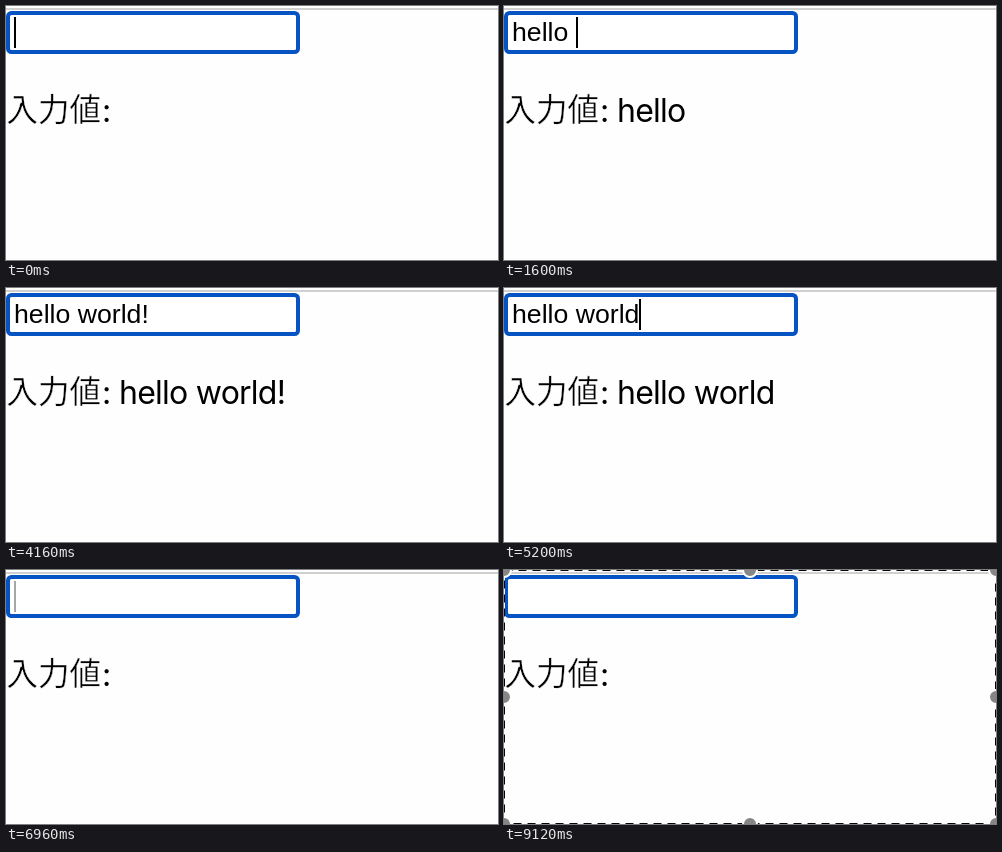
Recreate the animation shown at these times as an HTML page. Size 492x254 px, loop 9.2 s.

```html
<!DOCTYPE html>
<html lang="ja">
<head>
<meta charset="utf-8">
<title>入力値</title>
<style>
  html, body { margin: 0; width: 100%; height: 100%; overflow: hidden; background: #fefefe; }
  svg { display: block; width: 492px; height: 254px; }
  text { white-space: pre; fill: #000; }
  #field { font: 26.667px "Liberation Sans", Arial, sans-serif; }
  /* A thin background stroke lightens the regular weight */
  .label { font: 31.5px "Noto Sans CJK JP", "Noto Sans CJK", sans-serif; stroke: #fefefe; stroke-width: 0.4px; }
  .value { font: 32px Inter, sans-serif; letter-spacing: -0.75px; }
</style>
</head>
<body>
<svg viewBox="0 0 492 254">
  <rect y="2" width="492" height="2" fill="#d0d0d0"/>
  <rect x="2" y="7" width="290" height="39" rx="3.5" fill="#fff" stroke="#0653c3" stroke-width="4"/>
  <text id="field" x="8" y="35"></text>
  <rect id="caret" y="11" width="2" height="31"/>
  <text class="label" x="0.5" y="115.3">入力値</text>
  <text class="value" x="96" y="116">:</text>
  <text class="value" id="value" x="113" y="116"></text>
  <g id="selection" fill="none">
    <rect x="0.5" y="0.5" width="491" height="253" stroke="#fff"/>
    <rect x="0.5" y="0.5" width="491" height="253" stroke="#000" stroke-dasharray="8 6"/>
    <g id="handles" fill="#868686" stroke="#fff" stroke-width="2"></g>
  </g>
</svg>
<script>
const LOOP = 9200, STEP = 80, SELECT_AT = 7520;
const PHRASE = "hello world!";

// Runs of key presses; rest is how long the caret stays solid afterwards
const runs = [
  { at: 720, gap: 160, keys: 6, sign: 1, rest: 480 },
  { at: 1680, gap: 220, keys: 5, sign: 1, rest: 480 },
  { at: 3360, gap: 1, keys: 1, sign: 1, rest: 480 },
  { at: 4880, gap: 1, keys: 1, sign: -1, rest: 480 },
  { at: 5390, gap: 90, keys: 11, sign: -1, rest: 160 }
];
const FADE = 320, DARK = 80, SOLID = 320;
const CYCLE = 2 * FADE + DARK + SOLID;

const el = id => document.getElementById(id);
const field = el("field"), value = el("value"), caret = el("caret");
const clamp = (v, lo, hi) => Math.min(hi, Math.max(lo, v));

function setAttrs(node, attrs) {
  for (const name in attrs) node.setAttribute(name, attrs[name]);
}

for (const x of [0, 246, 492])
  for (const y of [0, 127, 254]) {
    if (x === 246 && y === 127) continue;
    const dot = document.createElementNS("http://www.w3.org/2000/svg", "circle");
    setAttrs(dot, { cx: x, cy: y, r: 7 });
    el("handles").append(dot);
  }

const pressed = (run, t) => clamp(Math.floor((t - run.at) / run.gap) + 1, 0, run.keys);
const textAt = t => PHRASE.slice(0, runs.reduce((n, run) => n + run.sign * pressed(run, t), 0));

const fadeOut = t => clamp(1 - t / FADE, 0, 1);

function caretOpacity(t) {
  if (t >= SELECT_AT) return 0;
  const run = runs.filter(r => r.at <= t).pop();
  if (!run) return fadeOut(t);
  const lastKey = run.at + run.gap * (pressed(run, t) - 1);
  const idle = t - lastKey - run.rest;
  if (idle < 0) return 1;
  const phase = idle % CYCLE;
  return Math.max(fadeOut(phase), clamp((phase - FADE - DARK) / FADE, 0, 1));
}

function draw(t) {
  const text = textAt(t);
  field.textContent = text;
  value.textContent = text;
  const width = text ? field.getComputedTextLength() : 0;
  setAttrs(caret, { x: Math.round(7.8 + width), opacity: caretOpacity(t) });
  el("selection").style.display = t >= SELECT_AT ? "" : "none";
}

const start = performance.now();
function tick() {
  const t = (performance.now() - start) % LOOP;
  draw(Math.floor(t / STEP) * STEP);
  requestAnimationFrame(tick);
}
tick();
</script>
</body>
</html>
```
